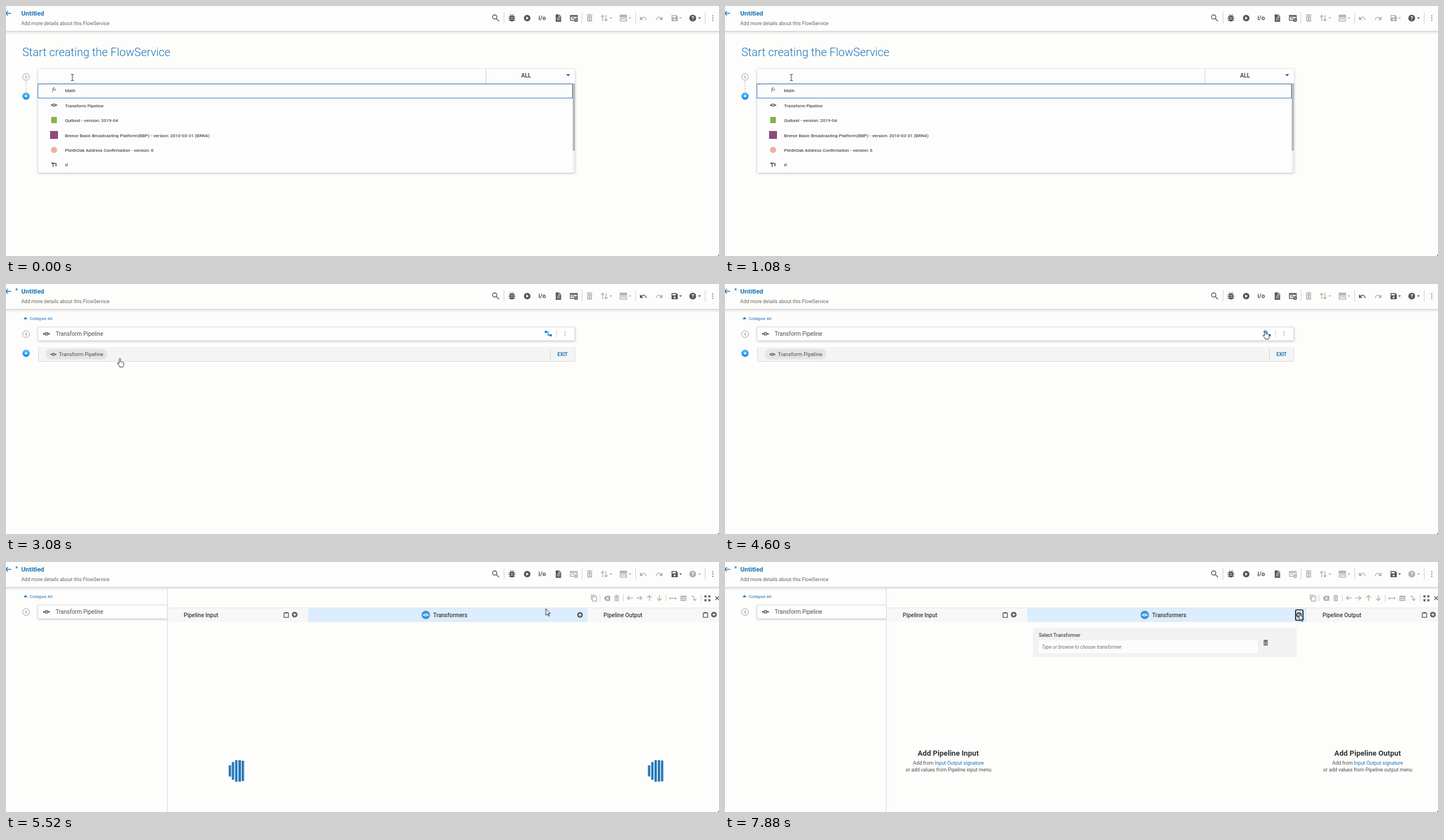
An HTML page that plays this animation: 1262 px wide and 444 px high, repeating every 8 s.

```html
<!DOCTYPE html>
<html lang="en">
<head>
<meta charset="utf-8">
<title>Flow editor</title>
<style>
html, body { margin: 0; width: 100%; height: 100%; overflow: hidden; background: #fdfdfc; }
svg.stage { display: block; width: 100vw; height: 100vh; }
text { font-family: Roboto, "Liberation Sans", sans-serif; fill: #4c4c4c; white-space: pre; }
.dark { color: #565656; }
.grey { color: #b0b0b0; }
.blue { color: #1b73b6; }
text.blue, tspan.blue { fill: #1b73b6; }
.f { fill: currentColor; }
.s { fill: none; stroke: currentColor; stroke-width: 1.4; }
.sep { stroke: #cfcfcf; fill: none; }
.item { font-size: 8px; font-weight: 500; }
.head { font-size: 10px; font-weight: 500; fill: #3c3c3c; }
.big { font-size: 13.1px; font-weight: 700; fill: #333; text-anchor: middle; }
.note { font-size: 8.75px; text-anchor: middle; }
.card { filter: drop-shadow(0 1px 2px #0004); }

/* Hard changes, all on the same 8 s clock */
.t { animation: 8s step-end infinite; }
.start { animation-name: start; }
.hover { animation-name: hover; }
.caret { animation-name: caret; }
.edited { animation-name: edited; }
.flow { animation-name: flow; }
.panel { animation-name: panel; }
.load { animation-name: load; }
.empty { animation-name: empty; }
.focus { animation-name: focus; }
.pick { animation-name: pick; }
.beam { animation-name: beam; }
.hand { animation-name: hand; }
.undo { animation-name: undo; }
.save { animation-name: save; }
.help { animation-name: help; }
@keyframes start { 0% { visibility: visible } 29%, 100% { visibility: hidden } }
@keyframes hover { 0% { visibility: hidden } 25% { visibility: visible } 29%, 100% { visibility: hidden } }
@keyframes caret { 0%, 13.5% { visibility: hidden } 7%, 20% { visibility: visible } 26.5%, 100% { visibility: hidden } }
@keyframes edited { 0% { visibility: hidden } 29%, 100% { visibility: visible } }
@keyframes flow { 0% { visibility: hidden } 29% { visibility: visible } 60%, 100% { visibility: hidden } }
@keyframes panel { 0% { visibility: hidden } 60%, 100% { visibility: visible } }
@keyframes load { 0% { visibility: hidden } 62% { visibility: visible } 73.5%, 100% { visibility: hidden } }
@keyframes empty { 0% { visibility: hidden } 73.5%, 100% { visibility: visible } }
@keyframes focus { 0% { visibility: hidden } 97%, 100% { visibility: visible } }
@keyframes pick { 0% { visibility: hidden } 97.5%, 100% { visibility: visible } }
@keyframes beam { 0% { visibility: visible } 24%, 100% { visibility: hidden } }
@keyframes hand { 0% { visibility: hidden } 24% { visibility: visible } 60%, 100% { visibility: hidden } }
@keyframes undo { 0% { color: #b0b0b0 } 29% { color: #565656 } 60%, 100% { color: #b0b0b0 } }
@keyframes save { 0% { color: #b0b0b0 } 29%, 100% { color: #565656 } }
@keyframes help { 0% { color: #565656 } 60%, 100% { color: #b0b0b0 } }

.pointer { animation: travel 8s linear infinite; }
@keyframes travel {
  0%, 23% { transform: translate(117.5px, 127px); animation-timing-function: ease-in-out }
  26.5%, 38.4% { transform: translate(144.5px, 174.5px) }
  38.5% { transform: translate(201.5px, 132.5px); animation-timing-function: ease-in-out }
  48.5% { transform: translate(968px, 108px); animation-timing-function: ease-out }
  52% { transform: translate(1012px, 106px); animation-timing-function: ease-in-out }
  57.5%, 59.9% { transform: translate(956.5px, 83px) }
  60%, 85% { transform: translate(955.5px, 83px); animation-timing-function: ease-in }
  88.5% { transform: translate(986px, 99px); animation-timing-function: ease-out }
  92%, 100% { transform: translate(1016.5px, 92.5px) }
}
.bar { fill: #1b73b6; transform-box: fill-box; transform-origin: center;
  animation: pulse 1s cubic-bezier(.2, .68, .18, 1.08) infinite; }
.bar:nth-child(1) { animation-delay: -.74s }
.bar:nth-child(2) { animation-delay: -.64s }
.bar:nth-child(3) { animation-delay: -.54s }
.bar:nth-child(4) { animation-delay: -.44s }
.bar:nth-child(5) { animation-delay: -.34s }
@keyframes pulse { 0%, 100% { transform: scaleY(1) } 50% { transform: scaleY(.4) } }
</style>
</head>
<body>
<svg class="stage" viewBox="0 0 1262 444" xmlns="http://www.w3.org/2000/svg">
<defs>
  <linearGradient id="shade" x2="0" y2="1"><stop stop-color="#d2d2d2"/><stop offset="1" stop-color="#d2d2d2" stop-opacity="0"/></linearGradient>
  <linearGradient id="sky" x2="0" y2="1"><stop stop-color="#5bbcf6"/><stop offset="1" stop-color="#1489dc"/></linearGradient>
  <g id="down"><path class="f" d="M-2.5-1.2h5L0 1.5z"/></g>
  <g id="dots" class="f"><circle cy="-4" r=".9"/><circle r=".9"/><circle cy="4" r=".9"/></g>
  <g id="trash"><path class="f" d="M-5-6h3l1-1h2l1 1h3v1.5H-5z"/><path class="f" fill-rule="evenodd" d="M-4.2-3.6h8.4V6h-8.4zM-2.4-2v6.4h1.4V-2zM1-2v6.4h1.4V-2z"/></g>
  <g id="pipe"><path class="s" d="M-6 0h4M2 0h4M-2-2h4v4h-4z" stroke-width="1"/><path class="f" d="M-6.5 0l2.6-2v4zM6.5 0L3.9-2v4z"/></g>
  <g id="arrow"><path class="s" d="M5 0H-4.4M-.6-4l-4 4 4 4" stroke-width="1.3"/></g>
  <g id="back"><path class="s" d="M-4 1C-1-3.5 4-2.5 5.2 3.5" stroke-width="1.7"/><path class="f" d="M-6-3v6.2h6.2z"/></g>
  <g id="add"><circle class="f" r="5"/><path d="M-3 0h6M0-3v6" stroke="#fff" stroke-width="1.3"/></g>
  <g id="clip"><path class="s" d="M-3.8-3.6h7.6v8h-7.6z" stroke-width="1.1"/><path class="f" d="M-2-5h4v2.4h-4z"/></g>
  <g id="plus"><circle r="6.5" fill="url(#sky)"/><path d="M-2.6 0h5.2M0-2.6v5.2" stroke="#fff" stroke-width="1.3"/></g>
  <g id="one"><circle r="6" fill="#fff" stroke="#9a9a9a"/><text y="2.9" font-size="8" text-anchor="middle">1</text></g>
  <g id="bars">
    <rect class="bar" x="-13.5" y="-19" width="4" height="38"/>
    <rect class="bar" x="-7.7" y="-19" width="4" height="38"/>
    <rect class="bar" x="-1.9" y="-19" width="4" height="38"/>
    <rect class="bar" x="3.9" y="-19" width="4" height="38"/>
    <rect class="bar" x="9.5" y="-19" width="4" height="38"/>
  </g>
</defs>

<rect width="1262" height="444" fill="#fdfdfc"/>

<!-- Page header -->
<rect y="45" width="1262" height="6" fill="url(#shade)" opacity=".55"/>
<path d="M0 45h1262" stroke="#c6c6c6"/>
<use href="#arrow" x="4" y="13" class="blue"/>
<text class="blue t edited" x="16.5" y="15" font-size="10" font-weight="700">*</text>
<text class="blue" x="27" y="17" font-size="11.5" font-weight="700">Untitled</text>
<text x="27" y="34" font-size="8.75" fill-opacity=".85">Add more details about this FlowService</text>

<!-- Main toolbar -->
<path class="sep" d="M881.5 11v20M1019.5 11v20M1114.5 11v20M1237.5 11v20"/>
<g class="dark">
  <circle class="s" cx="865" cy="19.5" r="3.8" stroke-width="1.6"/><path class="s" d="M868 22.5l4.6 4.6" stroke-width="2"/>
  <rect class="f" x="892" y="17" width="7" height="10.5" rx="3.5"/>
  <path class="s" d="M890 19h11M889.5 22h12M890 25.2h11M892.5 15l2 2.2M898.500 15l-2 2.200"/>
  <path d="M894 20.500h3M894 23.500h3" stroke="#fff"/>
  <circle class="f" cx="922.500" cy="21.500" r="5.800"/><path d="M920.800 18.600v5.800l4.300-2.900z" fill="#fff"/>
  <text x="942.500" y="25" font-size="11" font-weight="700">i/o</text>
  <path class="f" d="M973 15h6l3.500 3.500V28H973z"/><path d="M975 21.500h5.500M975 24.500h5.500M978.500 16v3.200h3.200" stroke="#fff" fill="none"/>
</g>
<g class="t help">
  <path class="s" d="M999 16.700h12v8.800h-12zM999 18.500h12M1001 21.500h5" stroke-width="1.300"/>
  <circle class="f" cx="1009" cy="25" r="3.300"/><path d="M1007.500 25h3M1009 23.500v3" stroke="#fff" stroke-width=".8"/>
</g>
<g class="grey">
  <use href="#trash" x="1033" y="21.500"/>
  <path class="s" d="M1056 27v-9.500M1053.300 19.500l2.700-3 2.700 3M1062 16v9.500M1059.300 23.500l2.700 3 2.700-3"/>
  <use href="#down" x="1070.500" y="21.500"/>
  <path class="s" d="M1087 16.200h11.500v4h-11.500zM1087 23h11.500v3.800h-11.500z"/><path class="f" d="M1087 16h11.500v3h-11.500z"/>
  <use href="#down" x="1104.500" y="21.500"/>
  <use href="#back" transform="translate(1156 21.500) scale(-1 1)"/>
</g>
<use href="#back" x="1128" y="21.500" class="t undo"/>
<g class="t save">
  <path class="f" fill-rule="evenodd" d="M1178 16h8.500l2.500 2.500V27h-11zM1179.500 17.500v2.800h6v-2.800zM1183.500 22.200a1.700 1.700 0 1 0 .01 0z"/>
  <use href="#down" x="1194" y="21.500"/>
</g>
<g class="t help">
  <circle class="f" cx="1215.500" cy="21.500" r="6"/><text x="1215.500" y="25" font-size="9.500" font-weight="700" text-anchor="middle" style="fill:#fff">?</text>
  <use href="#down" x="1227.500" y="21.500"/>
</g>
<use href="#dots" x="1251" y="21.500" class="dark"/>

<!-- Step search -->
<g class="t start">
  <text class="blue" x="29" y="89" font-size="20" font-weight="300">Start creating the FlowService</text>
  <path d="M35.500 134v19" stroke="#aaa" stroke-dasharray="2 2"/>
  <use href="#one" x="35.500" y="126"/><use href="#plus" x="35.500" y="160"/>
  <rect class="card" x="57" y="112" width="950" height="184" fill="#fdfdfd"/>
  <path class="sep" d="M849.500 112v25"/>
  <path d="M57 137.500h950" stroke="#ddd"/>
  <text x="920.500" y="127" font-size="10" font-weight="700" text-anchor="middle">ALL</text>
  <path class="f blue" d="M991.500 121h7l-3.500 4z"/>
  <rect x="1003" y="138" width="4" height="158" fill="#f0f0f0"/><rect x="1003" y="138" width="4" height="119" fill="#b9b9b9"/>
  <rect x="56.500" y="138.500" width="946" height="25" fill="none" stroke="#3478b4"/>
  <g class="item">
    <text x="104.500" y="153">Math</text>
    <text x="104.500" y="180">Transform Pipeline</text>
    <text x="104.500" y="206">Quibsel - version: 2019-04</text>
    <text x="104.500" y="232.500">Brenor Basic Broadcasting Platform(BBP) - version: 2010-03-31 (BRN4)</text>
    <text x="104.500" y="259">PlinthOak Address Confirmation - version: 6</text>
    <text x="104.500" y="285">If</text>
  </g>
  <g class="dark">
    <text x="81.500" y="153" font-size="10" font-style="italic">f<tspan font-size="7" dy="-2">n</tspan></text>
    <use href="#pipe" transform="translate(85 176) scale(.9)"/>
    <path class="s" d="M83.500 278v8M81 279.500h7.500v3" stroke-width="1"/><path class="f" d="M80.500 278h2.500v2.500h-2.500zM86.800 282h3.400l-1.700 3z"/>
  </g>
  <rect x="80" y="197" width="10" height="11" fill="#86b448"/>
  <rect x="78" y="222" width="14" height="14" fill="#8c4a7c"/>
  <circle cx="85" cy="255.500" r="5.500" fill="#f0b0a2"/>
</g>
<path class="t caret" d="M75.500 118.500v13" stroke="#3c82ba"/>
<g class="t hover">
  <rect x="56.500" y="164.500" width="946" height="26" fill="none" stroke="#3478b4"/>
  <text x="229" y="180" font-size="8">Use this step to make pipeline modifications. You can accomplish multiple data transformations on the pipeline data in a single step.</text>
</g>

<!-- Flow steps -->
<g class="t edited">
  <path class="f blue" d="M31 62.500h7l-3.500-4z"/>
  <text class="blue" x="42" y="63.500" font-size="7.650">Collapse All</text>
  <use href="#one" x="35.500" y="89"/>
  <rect class="card" x="57" y="77" width="950" height="23.500" fill="#fefefe"/>
  <rect x="56.500" y="76.500" width="950" height="24" fill="none" stroke="#dedede"/>
  <use href="#pipe" x="71.500" y="88.500" class="dark"/>
  <text x="88" y="92" font-size="10">Transform Pipeline</text>
</g>
<g class="t flow">
  <g style="color:#1a86e0"><path class="s" d="M956 85h3.500v6h4"/><path class="f" d="M953.500 83h4v4h-4zM962 89h4v4h-4z"/></g>
  <path class="sep" d="M974.500 82v13"/>
  <use href="#dots" transform="translate(989.500 88.500) scale(.8)" class="blue"/>
  <use href="#plus" x="35.500" y="123"/>
  <rect x="57" y="112" width="950" height="25.500" fill="#f4f4f4"/>
  <path d="M57.500 112v25.500h949.500V112" fill="none" stroke="#dcdcdc"/>
  <rect x="70" y="115" width="109.500" height="19" rx="9.500" fill="#e5e5e5"/>
  <use href="#pipe" transform="translate(84 125) scale(.85)" class="dark"/>
  <text x="93.500" y="128" font-size="9.400">Transform Pipeline</text>
  <path class="sep" d="M963.500 116v17"/>
  <text class="blue" x="976" y="128" font-size="8.700" font-weight="700">EXIT</text>
</g>

<!-- Pipeline panel -->
<g class="t panel">
  <rect x="285" y="48" width="977" height="396" fill="#fdfdfc"/>
  <path d="M285.500 47v397" stroke="#d6d6d6"/>
  <path class="sep" d="M1051.500 58v12M1092.500 58v12M1168.500 58v12M1230.500 58v12"/>
  <g class="grey">
    <path class="s" d="M1038 61.500h7.500v8H1038zM1036 67v-8h7.500" stroke-width="1.200"/>
    <path class="f" d="M1058 64.500l3.500-4.500h8v9h-8z"/><path d="M1062.500 62l4 5m0-5l-4 5" stroke="#fff" stroke-width="1.200"/>
    <use href="#trash" transform="translate(1081 64.500) scale(.85)"/>
    <use href="#arrow" x="1104.500" y="64"/>
    <use href="#arrow" transform="translate(1121 64) rotate(180)"/>
    <use href="#arrow" transform="translate(1139 64) rotate(90)"/>
    <use href="#arrow" transform="translate(1156.500 64) rotate(-90)"/>
    <path class="s" d="M1175 64.500h10.500" stroke-width="1.200"/><path class="f" d="M1173.500 64.500l3-2.500v5zM1187 64.500l-3-2.500v5z"/>
    <path class="s" d="M1194.500 60.500h9v8h-9zM1194.500 64.500h9M1197.500 64v4.500M1200.500 64v4.500" stroke-width="1"/><path class="f" d="M1194 60h10v2.500h-10z"/>
    <path class="s" d="M1213 60.500q6 0 6 7M1216 65.500l3 3 3-3" stroke-width="1.300"/>
  </g>
  <g class="dark">
    <path class="s" d="M1237 63v-3h3M1243 60h3v3M1246 66v3h-3M1240 69h-3v-3M1237 60l3 3M1246 60l-3 3M1246 69l-3-3M1237 69l3-3"/>
    <path class="s" d="M1255.500 61l6.500 6.500M1262 61l-6.500 6.500" stroke-width="1.800"/>
  </g>
  <rect x="286" y="82" width="976" height="24.500" fill="#f7f7f7"/>
  <path d="M286 81.500h976" stroke="#e4e4e4"/>
  <rect x="535" y="82" width="494" height="24.500" fill="#dcedfd"/>
  <text class="head" x="314.500" y="98">Pipeline Input</text>
  <text class="head" x="756" y="97.500">Transformers</text>
  <text class="head" x="1057.500" y="98">Pipeline Output</text>
  <circle cx="743" cy="94" r="7.500" fill="#3d95d4"/>
  <use href="#pipe" transform="translate(743 94) scale(.85)" color="#fff"/>
  <g class="dark">
    <use href="#clip" x="496" y="94"/><use href="#add" x="511" y="93.500"/>
    <use href="#add" x="1016" y="94"/>
    <use href="#clip" x="1238" y="94"/><use href="#add" x="1253" y="93.500"/>
  </g>
</g>
<g class="t load">
  <use href="#bars" x="407.500" y="371"/><use href="#bars" x="1149.800" y="371"/>
</g>
<g class="t empty">
  <text class="big" x="395" y="343.500">Add Pipeline Input</text>
  <text class="note" x="395.500" y="359.500">Add from <tspan class="blue">Input Output signature</tspan></text>
  <text class="note" x="395.500" y="372">or add values from Pipeline input menu</text>
  <text class="big" x="1137.500" y="343.500">Add Pipeline Output</text>
  <text class="note" x="1137.500" y="359.500">Add from <tspan class="blue">Input Output signature</tspan></text>
  <text class="note" x="1137.500" y="372">or add values from Pipeline output menu</text>
</g>
<g class="t pick">
  <rect x="545" y="117" width="467" height="52" fill="#f2f2f2"/>
  <text x="555.500" y="133" font-size="8.600" font-weight="500">Select Transformer</text>
  <rect x="555" y="139" width="388" height="23" fill="#fcfcfc"/>
  <text x="560.500" y="154" font-size="8.600" font-style="italic" fill-opacity=".8">Type or browse to choose transformer</text>
  <use href="#trash" transform="translate(957 143.500) scale(.8)" class="dark"/>
</g>
<rect class="t focus" x="1010" y="85" width="13" height="18.500" rx="2" fill="none" stroke="#151515" stroke-width="1.700"/>

<rect x="1261" y="442" width="1" height="2" fill="#222"/>

<!-- Mouse pointer -->
<g class="pointer" stroke="#222" fill="#fff" stroke-linejoin="round">
  <path class="t beam" fill="none" d="M-2.500-5.500h2l.5.500.500-.500h2M0-5V5M-2.500 5.500h2l.5-.500.500.500h2"/>
  <path class="t hand" d="M-1.300 9V1.300a1.300 1.300 0 0 1 2.600 0V5.800q1.300-.800 2 .400 1.300-.600 2 .500 1.500-.300 1.500 1.300v2.700q0 1.800-1.100 3.300v1H-.200v-1Q-1.500 11.700-4 9.300-4.600 7.500-3 7.500z"/>
  <path class="t panel" d="M0 0v11.500l2.600-2.400 1.900 4.200 1.700-.700-1.900-4.200H7.800z"/>
</g>
</svg>
</body>
</html>
```
